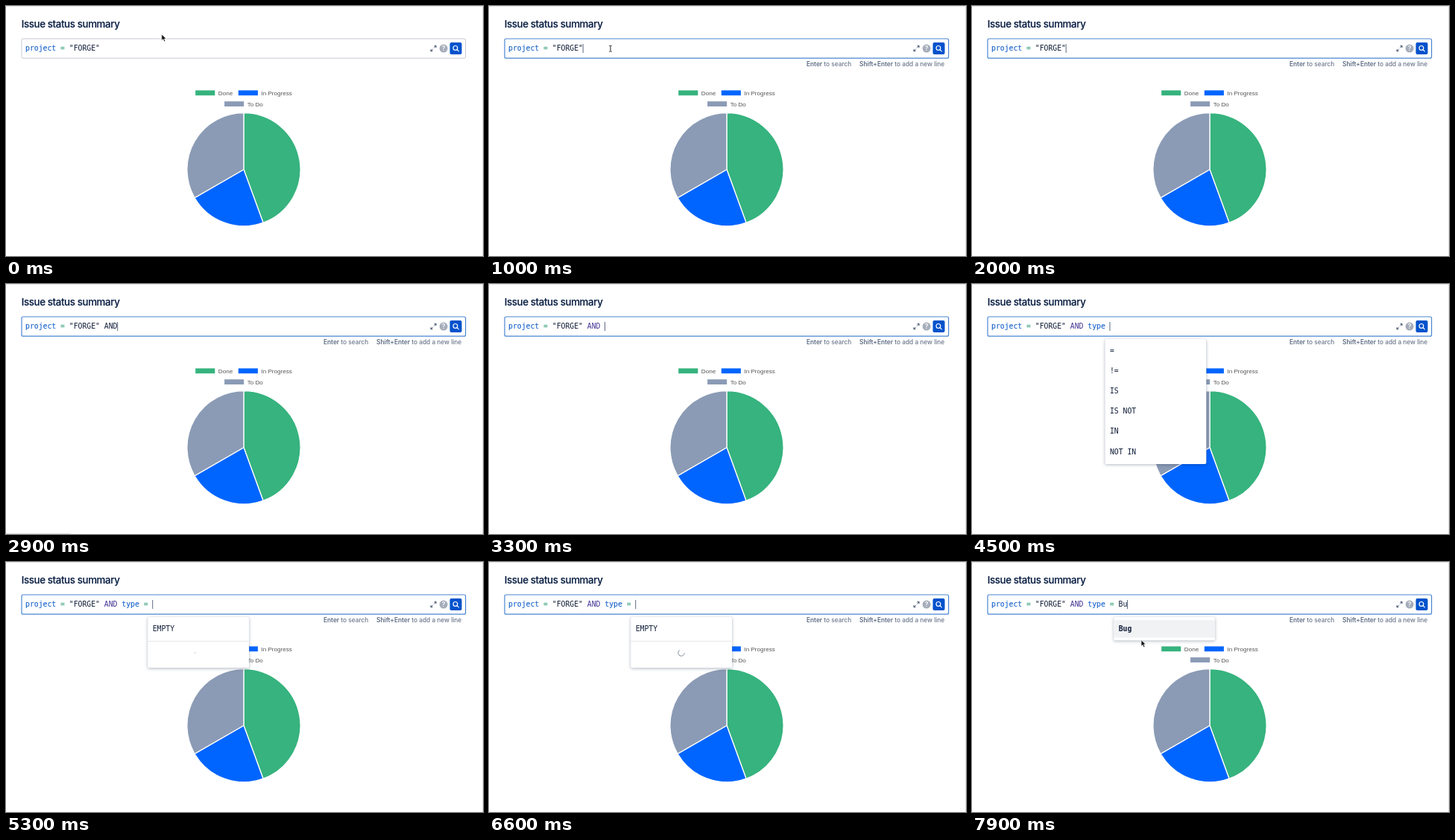
An HTML page that plays this animation: 640x336 px, repeating every 8 s.

```html
<!DOCTYPE html>
<html lang="en">
<head>
<meta charset="utf-8">
<title>Issue status summary</title>
<style>
  html, body { margin: 0; width: 100%; height: 100%; overflow: hidden; background: #fff; }
  svg { display: block; width: 100vw; height: 100vh; }
  text { white-space: pre; }
  .title { font: 500 13.3px Inter, sans-serif; letter-spacing: -.37px; fill: #091e42; stroke: #091e42; stroke-width: .15px; }
  .legend { font: 8.1px "Liberation Sans", Arial, sans-serif; fill: #555; }
  .hint { font: 500 8.3px Inter, sans-serif; fill: #6b778c; }
  .hint tspan { font-weight: 600; fill: #5e6c84; }
  .mono { font: 9.77px "DejaVu Sans Mono", monospace; fill: #101d38; }
  .field { fill: #1d66cc; stroke: #1d66cc; stroke-width: .15px; }
  .operator { fill: #1f9466; }
  .keyword { fill: #403294; }
  .match { font-weight: 700; }
  .sub { fill: #6b778c; }
  .panel { filter: drop-shadow(0 1.5px 2px rgba(9, 30, 66, .25)) drop-shadow(0 0 .5px rgba(9, 30, 66, .25)); fill: #fff; }
</style>
</head>
<body>
<svg id="stage" viewBox="0 0 640 336">
  <rect width="640" height="336" fill="#fff"/>
  <path d="M0 .5H639.5V336" fill="none" stroke="#e6e7ea"/>
  <text class="title" x="20.7" y="29.1">Issue status summary</text>

  <rect id="box" x="21" y="44" width="595.6" height="26.2" rx="2" fill="#fff"/>
  <g id="query"></g>
  <path id="caret" d="M0 51V63" stroke="#344563" stroke-width=".8"/>

  <path d="M574.3 56.3L577 53.6M574.6 53.6H577V56M572.7 57.9L570 60.6M570 58.2V60.6H572.4" fill="none" stroke="#253858" stroke-width=".9"/>
  <circle cx="587.1" cy="57.1" r="5.5" fill="#a5adba"/>
  <text x="587.1" y="60.2" text-anchor="middle" font-family="Inter, sans-serif" font-size="8.5" font-weight="600" fill="#fff">?</text>
  <rect x="595.5" y="48.9" width="16" height="16" rx="2" fill="#0052cc"/>
  <g fill="none" stroke="#fff" stroke-width="1.2" stroke-linecap="round">
    <circle cx="602.9" cy="56.4" r="2.9"/><path d="M605.1 58.6L607.3 60.8"/>
  </g>

  <g id="hints" class="hint">
    <text x="426" y="81.3"><tspan>Enter</tspan> to search</text>
    <text x="497" y="81.3"><tspan>Shift+Enter</tspan> to add a new line</text>
  </g>

  <g id="chart"></g>
  <g id="panels"></g>

  <path id="edge" d="M0 335.5H86" stroke="#dcdde0"/>
  <path id="arrow" d="M0 0V8.4L2 6.6L3.4 9.8L5 9.1L3.6 6H6.2Z" fill="#111" stroke="#fff" stroke-width=".7"/>
  <path id="beam" d="M-1.7 -4H-.6L0 -3.4L.6 -4H1.7M0 -3.4V3.4M-1.7 4H-.6L0 3.4L.6 4H1.7" fill="none" stroke="#222" stroke-width="1"/>
</svg>
<script>
const LOOP = 8000, CHAR = 5.88, LEFT = 26, FOCUS = 1000;
const $ = id => document.getElementById(id);
const columnX = column => LEFT + column * CHAR;
const show = (node, on) => { node.style.visibility = on ? 'visible' : 'hidden'; };

function add(parent, tag, attrs, content = '') {
  const node = document.createElementNS('http://www.w3.org/2000/svg', tag);
  for (const key in attrs) node.setAttribute(key, attrs[key]);
  node.textContent = content;
  parent.append(node);
  return node;
}

// Pie and legend; turns are fractions of the circle, clockwise from the top.
const PIE = { x: 319, y: 219.7, r: 76.1 };
const slices = [
  { name: 'Done', color: '#36b37e', from: 0, to: 4 / 9, x: 254.2, y: 113.4 },
  { name: 'In Progress', color: '#0065ff', from: 4 / 9, to: 6 / 9, x: 311.8, y: 113.4 },
  { name: 'To Do', color: '#8b9bb5', from: 6 / 9, to: 1, x: 293.1, y: 128.2 }
];
const rim = turn => {
  const angle = turn * 2 * Math.PI;
  return `${PIE.x + PIE.r * Math.sin(angle)} ${PIE.y - PIE.r * Math.cos(angle)}`;
};
for (const { name, color, from, to, x, y } of slices) {
  add($('chart'), 'path', {
    d: `M${PIE.x} ${PIE.y}L${rim(from)}A${PIE.r} ${PIE.r} 0 0 1 ${rim(to)}Z`,
    fill: color, stroke: '#fff', 'stroke-width': 1.3, 'stroke-linejoin': 'round'
  });
  add($('chart'), 'rect', { x, y, width: 26.1, height: 6.8, fill: color });
  add($('chart'), 'text', { class: 'legend', x: x + 30.6, y: y + 6.4 }, name);
}

// Query tokens, each starting at a fixed column.
const QUERY = 'project = "FORGE" AND type = Bu';
const tokens = [
  [0, 7, 'field'], [8, 9, 'operator'], [10, 17, ''], [18, 21, 'keyword'],
  [22, 26, 'field'], [27, 28, 'operator'], [29, 31, '']
].map(([start, end, kind]) => ({
  start, end, kind, node: add($('query'), 'text', { x: columnX(start), y: 60.4 })
}));

const INITIAL = 17;
const keyTimes = [2200, 2400, 2600, 2800, 3300, 3700, 4050, 4200, 4300, 4400, 4900, 5200, 7400, 7800];

// Suggestion panels.
const ROW = 27.1, FIRST_ROW = 93;
function panel(from, to, column, width, height) {
  const node = add($('panels'), 'g', {});
  const x = columnX(column) - 6.4;
  add(node, 'rect', { class: 'panel', x, y: 74, width, height, rx: 2 });
  return { node, from, to, x };
}
function row({ node, x }, y, label, bold = 0) {
  const text = add(node, 'text', { class: 'mono', x: x + 6.6, y });
  add(text, 'tspan', { class: 'match' }, label.slice(0, bold));
  add(text, 'tspan', {}, label.slice(bold));
}

const fields = panel(3700, 4200, 22, 239.5, 203);
const SUBLINE = 15.2;
['Target end – cf[11429]', 'Target start – cf[11428]', 'tdropdown', 'Team.category', 'Team – cf[11466]', 'Team']
  .forEach((label, i) => row(fields, FIRST_ROW + ROW * i + (i > 2 ? SUBLINE : 0), label, 1));
add(fields.node, 'circle', { cx: 161, cy: 159.3, r: 3.5, fill: '#6b778c' });
add(fields.node, 'path', { d: 'M159.3 158.5H162.7L161 160.6Z', fill: '#fff' });
add(fields.node, 'text', { class: 'mono sub', x: 169, y: 162.5 }, 'Dropdown');
add(fields.node, 'text', { class: 'mono sub', x: 155.6, y: 258.8 }, 'Team');
add(fields.node, 'rect', { x: 382.3, y: 79, width: 4.8, height: 50.5, rx: 2.4, fill: '#c1c1c1' });

const operators = panel(4400, 4900, 27, 136, 168);
['=', '!=', 'IS', 'IS NOT', 'IN', 'NOT IN'].forEach((label, i) => row(operators, FIRST_ROW + ROW * i, label));

const values = panel(5200, 7400, 29, 136, 68.3);
row(values, FIRST_ROW, 'EMPTY');
add(values.node, 'path', { d: 'M190.5 106.4H325.7', stroke: '#e4e6ea' });
const spinner = add(values.node, 'circle', {
  cx: 258, cy: 122, r: 4.2, fill: 'none', stroke: '#8993a4', 'stroke-width': 1, 'stroke-linecap': 'round'
});

const bug = panel(7400, LOOP, 29, 136, 31.6);
add(bug.node, 'rect', { x: bug.x, y: 78, width: 136, height: 23.6, fill: '#f1f2f4' });
row(bug, FIRST_ROW, 'Bug', 3);

const panels = [fields, operators, values, bug];

function drawQuery(t) {
  const typed = keyTimes.filter(time => time <= t);
  const length = INITIAL + typed.length;
  for (const { start, end, kind, node } of tokens) {
    node.textContent = QUERY.slice(start, Math.min(end, Math.max(start, length)));
    // Keywords gain their colour only once the following space is typed.
    node.setAttribute('class', 'mono ' + (kind === 'keyword' && length <= end ? '' : kind));
  }
  const since = t - (typed.at(-1) ?? FOCUS);
  $('caret').setAttribute('transform', `translate(${columnX(length) + .2})`);
  show($('caret'), t >= FOCUS && since % 1000 < 500);
}

function drawPointer(t) {
  const p = Math.min(1, Math.max(0, (t - 100) / 750));
  const eased = p * p * (3 - 2 * p);
  const late = t >= 7800;
  const x = late ? 227 : 208.8 - 45.8 * eased;
  const y = late ? 104.8 : 38 + 19.3 * eased;
  const inside = !late && y > 45;
  for (const id of ['arrow', 'beam']) $(id).setAttribute('transform', `translate(${x} ${y})`);
  show($('arrow'), late || !inside);
  show($('beam'), inside && t < 1900);
}

function draw(t) {
  const focused = t >= FOCUS;
  $('box').setAttribute('stroke', focused ? '#4a86d4' : '#c4c9d2');
  $('box').setAttribute('stroke-width', focused ? 1.2 : 1);
  show($('hints'), focused);
  show($('edge'), t >= 2800 && t < 3100);
  panels.forEach(({ node, from, to }) => show(node, t >= from && t < to));
  const load = Math.max(0, t - 5300);
  spinner.setAttribute('stroke-dasharray', `${Math.min(16, .1 + load / 30)} 40`);
  spinner.setAttribute('transform', `rotate(${180 + load * .42} 258 122)`);
  drawQuery(t);
  drawPointer(t);
}

const began = performance.now();
function tick() {
  draw((performance.now() - began) % LOOP);
  requestAnimationFrame(tick);
}
tick();
</script>
</body>
</html>
```
